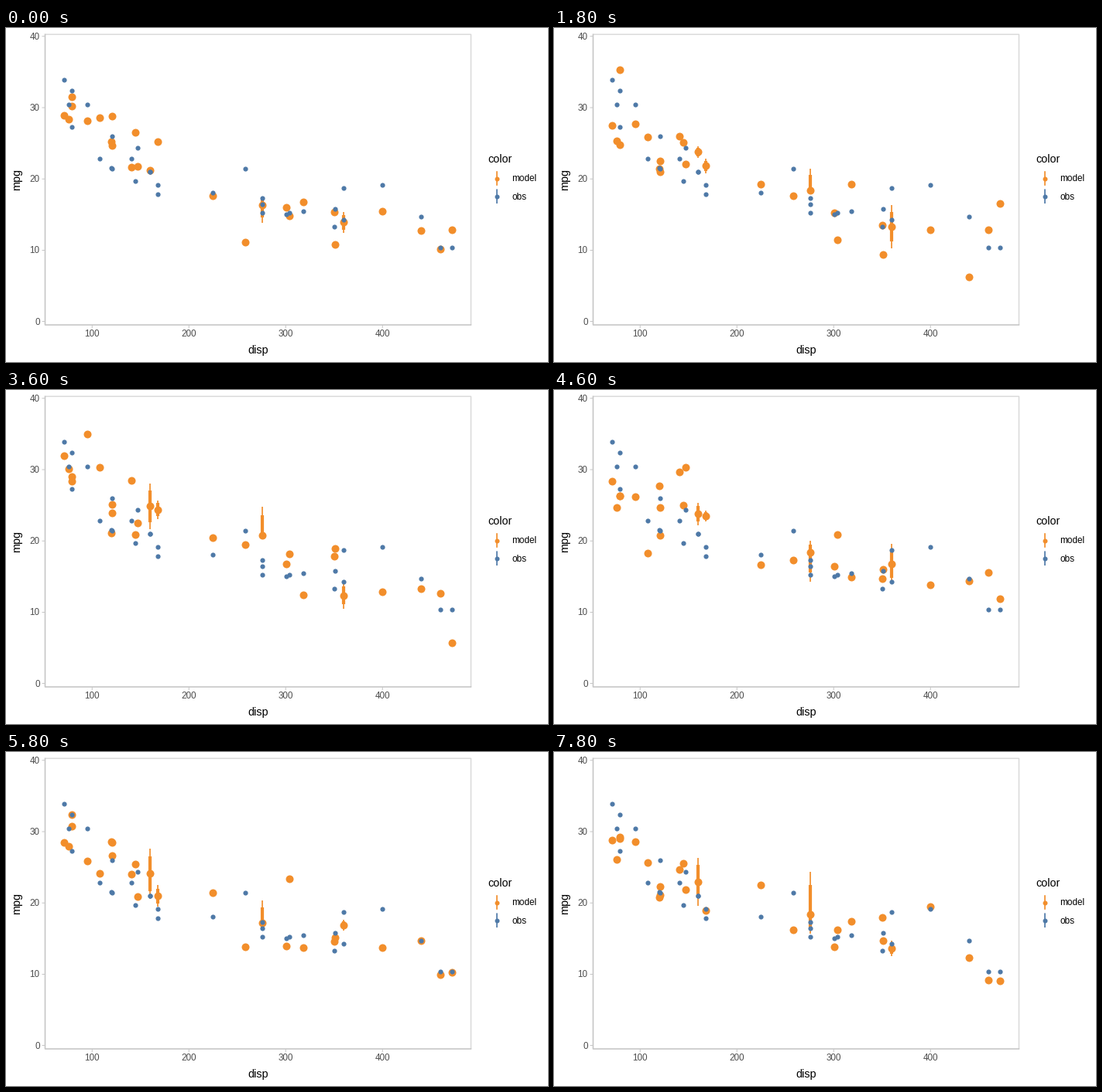
Write a matplotlib script that moves like this. It is 700 px wide and 432 px high and loops after 8 s.

```python
import numpy as np
import matplotlib.pyplot as plt
from matplotlib.animation import FuncAnimation
from matplotlib.collections import LineCollection

W, H, DPI = 700, 432, 100
PX = 72 / DPI  # points per pixel
FRAMES, INTERVAL = 40, 200
ORANGE, BLUE = "#f28e2b", "#4e79a7"
LEFT, RIGHT, TOP, BOTTOM = 50.5, 600.5, 8.3, 384
NOISE = 2.9

plt.rcParams["font.family"] = "Liberation Sans"

# Observed mpg for every displacement
OBS = {
    71.1: [33.9], 75.7: [30.4], 78.7: [32.4], 79: [27.3], 95.1: [30.4],
    108: [22.8], 120.1: [21.5], 120.3: [26], 121: [21.4], 140.8: [22.8],
    145: [19.7], 146.7: [24.4], 160: [21, 21], 167.6: [19.2, 17.8],
    225: [18.1], 258: [21.4], 275.8: [16.4, 17.3, 15.2], 301: [15],
    304: [15.2], 318: [15.5], 350: [13.3], 351: [15.8], 360: [14.3, 18.7],
    400: [19.2], 440: [14.7], 460: [10.4], 472: [10.4],
}


def px(disp):
    return 1.25 * np.asarray(disp) - 13.8


def py(mpg):
    return 379.6 - 9.22 * np.asarray(mpg)


def predict(k):
    """One predictive draw: simulated mpg values for each displacement."""
    rng = np.random.default_rng(700 + k)
    return {d: 40.3 - 1.35 * np.sqrt(d) + rng.normal(0, NOISE, len(seen))
            for d, seen in OBS.items()}


fig = plt.figure(figsize=(W / DPI, H / DPI), dpi=DPI, facecolor="white")
ax = fig.add_axes([0, 0, 1, 1])
ax.set_xlim(0, W)
ax.set_ylim(H, 0)
ax.axis("off")


def line(x, y, color, width, z=1):
    ax.plot(x, y, color=color, lw=width * PX, solid_capstyle="butt",
            zorder=z, snap=False)


def label(x, y, text, size, color="black", **kw):
    ax.text(x, y, text, fontsize=size * PX, color=color, va="baseline", **kw)


def dots(x, y, color, size, z):
    return ax.scatter(x, y, s=(size * PX) ** 2, color=color, lw=0, zorder=z)


def bars(width):
    lines = LineCollection([], colors=ORANGE, linewidths=width * PX, zorder=3)
    lines.set_capstyle("butt")
    return ax.add_collection(lines, autolim=False)


# Panel and axes
line([LEFT, RIGHT, RIGHT], [TOP, TOP, BOTTOM], "#dadada", 1.5)
line([LEFT, LEFT, RIGHT + .7], [TOP - .7, BOTTOM, BOTTOM], "#c6c6c6", 1.6, 2)
for v in range(0, 41, 10):
    line([LEFT - 4, LEFT], [py(v)] * 2, "#b8b8b8", .8)
    label(43.5, py(v) + 4, str(v), 11.6, "#4d4d4d", ha="right")
for v in range(100, 401, 100):
    line([px(v)] * 2, [BOTTOM, BOTTOM + 4], "#b8b8b8", .8)
    label(px(v), 399, str(v), 11.6, "#4d4d4d", ha="center")
label(325.5, 420.5, "disp", 14.4, ha="center")
label(18, 196.5, "mpg", 14.4, ha="center", rotation=90,
      rotation_mode="anchor")

# Legend
label(622.5, 174, "color", 14.4)
for y, name, color in [(194.5, "model", ORANGE), (217.7, "obs", BLUE)]:
    line([634, 634], [y - 9.3, y + 9.3], color, 1.7)
    dots([634], [y], color, 6, 2)
    label(653, y + 4, name, 11.73)

# Data
thin, thick = bars(1.7), bars(4.2)
model = dots([], [], ORANGE, 10, 4)
points = [(px(d), py(v)) for d, seen in OBS.items() for v in seen]
dots(*zip(*points), BLUE, 6.2, 5)


def update(k):
    draw = predict(k)
    model.set_offsets([(px(d), py(np.median(y))) for d, y in draw.items()])
    for lines, width in ((thin, .95), (thick, .66)):
        tails = [(1 - width) / 2, (1 + width) / 2]
        lines.set_segments([[(px(d), py(q)) for q in np.quantile(y, tails)]
                            for d, y in draw.items() if len(y) > 1])
    return thin, thick, model


anim = FuncAnimation(fig, update, frames=FRAMES, interval=INTERVAL,
                     repeat=True, repeat_delay=0)
plt.show()
```
